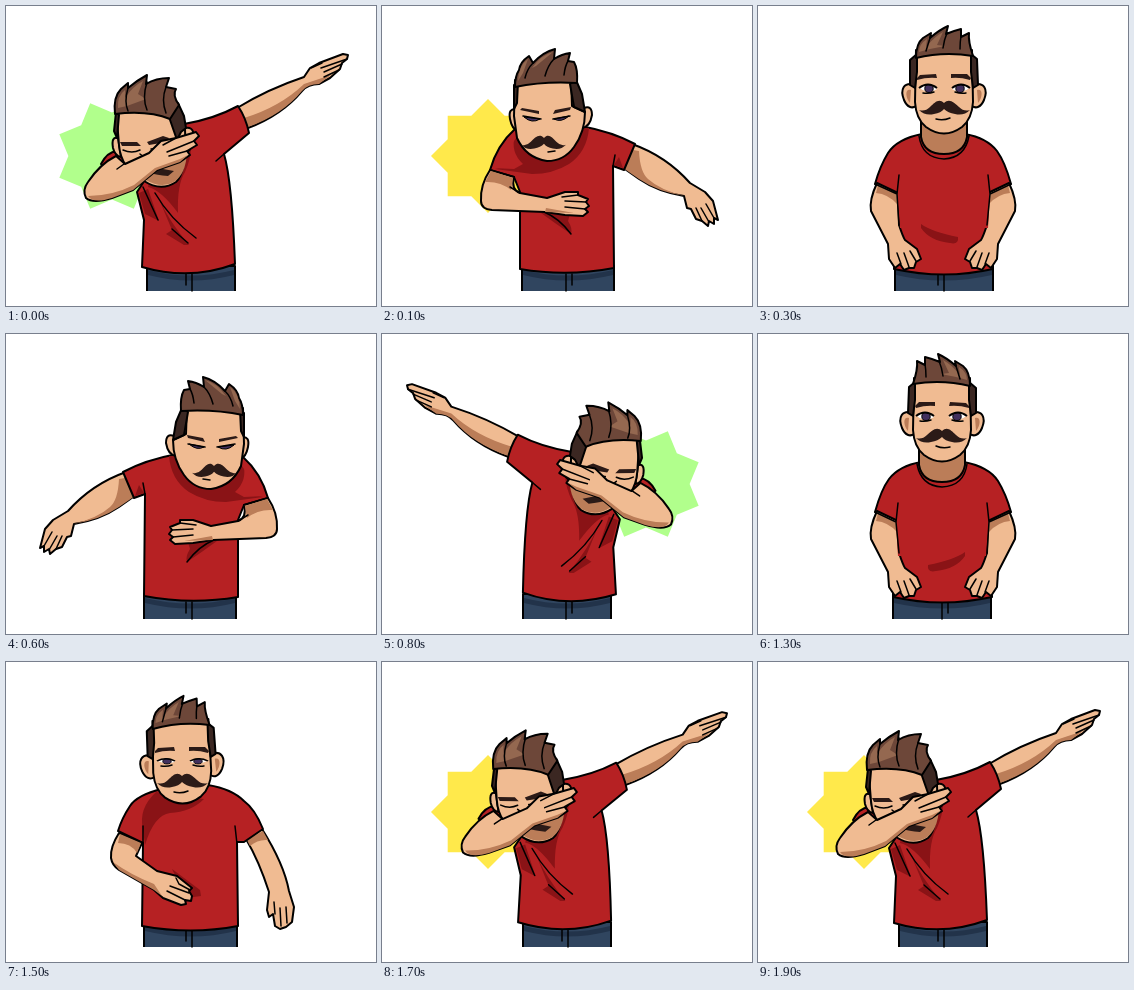
Recreate the animation shown at these times as an HTML page. Size 370 by 300 pixels, loop 2000 ms.

```html
<!DOCTYPE html>
<html lang="en">
<head>
<meta charset="utf-8">
<style>
  html, body { margin: 0; width: 100%; height: 100%; overflow: hidden; background: #fff; }
  svg { display: block; width: 370px; height: 300px; }
  path, ellipse { stroke: #000; stroke-width: 2; stroke-linejoin: round; stroke-linecap: butt; fill: none; }
  .flat { stroke: none; }
  .thin { stroke-width: 1.5; stroke-linecap: round; }
  .skin { fill: #f0bb92; }
  .tan { fill: #bb7d58; }
  .shirt { fill: #b62123; }
  .fold { fill: #8a1316; }
  .hair { fill: #6d4739; }
  .gloss { fill: #946850; }
  .dark { fill: #3b2722; }
  .brow { fill: #2b1a17; }
  .white { fill: #fff; }
  .iris { fill: #42305e; stroke-width: 1; }
  .jeans { fill: #30455f; }
  .denim { fill: #22334a; }
</style>
</head>
<body>
<svg viewBox="0 0 370 300"><g id="scene"></g></svg>
<script>
const path = (kind, d) => `<path class="${kind}" d="${d}"/>`;
const group = (transform, content) => `<g transform="${transform}">${content}</g>`;
const flip = content => group('translate(370 0) scale(-1 1)', content);

const jeans = (left, right) =>
  path('jeans', `M${left} 285V260H${right}V285`) +
  path('denim flat', `M${left + 1} 264Q185 275 ${right - 1} 264V269Q185 280 ${left + 1} 269Z`) +
  path('thin', 'M180 268V279M186 268V285');

const moustache =
  path('brow flat', 'M186 97C181 92 177 96 172 101Q167 106 161 104Q167 110 176 108Q183 107 186 103Q190 107 197 108Q206 110 212 104Q206 106 201 101C196 96 191 92 186 97Z');

const skull =
  path('skin', 'M158 79C145 75 142 84 146 94C149 101 154 103 158 100Z') +
  path('skin', 'M214 79C227 75 230 84 226 94C223 101 218 103 214 100Z') +
  path('tan flat', 'M153 84C147 82 147 91 152 97ZM219 84C225 82 225 91 220 97Z') +
  path('skin', 'M158 44L157 96Q158 113 168 121Q186 134 204 121Q214 113 215 96L214 44Z') +
  path('dark', 'M159 48L152 54V79L157 82L159 66Z') +
  path('dark', 'M213 48L219 53L220 79L215 82L213 66Z') +
  path('hair', 'M158 52C158 42 160 36 165 32L173 27L172 32Q181 24 190 20L188 28Q195 25 203 23L203 31L211 27Q210 35 215 50Q186 45 158 52Z') +
  path('gloss flat', 'M161 46Q161 38 169 33L168 41Q176 31 185 26L179 39L187 40L172 43Z') +
  path('thin', 'M168 45L172 32M185 42Q186 34 189 27M202 43Q202 36 203 30');

const features = openness =>
  path('brow flat', 'M159 72L162 69L178 68L179 72Q169 71 159 74ZM193 68L209 68L213 72L212 74Q202 71 193 72Z') +
  group(`translate(0 ${82 * (1 - openness)}) scale(1 ${openness})`,
    path('white flat', 'M162 82Q170 76 179 83Q170 89 162 82ZM194 83Q202 76 211 82Q203 89 194 83Z') +
    '<ellipse class="iris" cx="171" cy="82.5" rx="4.2" ry="4"/>' +
    '<ellipse class="iris" cx="202" cy="82.5" rx="4.2" ry="4"/>' +
    path('', 'M161 82Q170 75 179 82M194 82Q203 75 212 82')) +
  path('thin', 'M165 87Q171 88 176 86M197 86Q203 88 208 87') +
  moustache + path('thin', 'M178 113Q185 115 192 112');

const turnedHead =
  path('skin', 'M168 102Q160 99 160 109Q162 121 170 122Z') +
  path('skin', 'M236 103Q244 102 242 113Q240 123 235 124Z') +
  path('skin', 'M181 72L180 100L167 106Q167 126 178 141Q188 155 205 155Q226 152 235 132L238 110L237 74Z') +
  path('dark', 'M176 74L170 88L167 106L178 101L182 78Z') +
  path('dark', 'M234 76L238 79V103L235 97Z') +
  path('hair', 'M175 77Q174 63 178 56L184 55L182 47Q190 48 198 53L197 43Q209 46 219 57L223 50Q232 56 233 64Q237 70 237 81Q208 75 175 77Z') +
  path('gloss flat', 'M199 46Q211 49 220 62L216 60ZM224 53Q233 59 234 75L229 67Z') +
  path('thin', 'M188 69Q187 60 184 55M207 70Q204 59 198 53M227 72Q225 63 219 57') +
  path('brow flat', 'M181 101L197 104L199 108L182 104ZM213 105L230 102L232 104L213 108Z') +
  path('iris', 'M183 110L198 113Q191 117 183 110ZM212 113L228 111Q220 118 212 113Z') +
  path('thin', 'M182 110L199 113M211 113L229 110') +
  group('translate(208 132) scale(.88 .95) translate(-186 -97)', moustache) +
  path('thin', 'M197 145L204 146');

const restArm =
  path('skin', 'M119 177Q111 194 113 205L130 238L131 253L137 262L142 258L146 264L151 262L156 262L158 256L163 253L159 243L147 234Q145 231 141 219L140 187Z') +
  path('tan flat', 'M120 179L139 188V198Q130 188 118 187Z') +
  path('thin', 'M139 247L143 258M146 247L151 261M152 245L158 255');

const neutral =
  jeans(137, 235) +
  path('shirt', 'M164 128Q139 133 130 147Q122 160 117 178L139 188L136 263Q186 274 235 263L232 188L253 178Q247 156 239 145Q229 132 207 128Z') +
  restArm + flip(restArm) +
  path('shirt flat', 'M141 170L139 188L142 222H230L232 188L230 170Z') +
  path('thin', 'M117 178L139 188L141 169M139 188L141 219M253 178L232 188L230 169M232 188L229 219') +
  path('tan', 'M163 112V131Q166 148 186 148Q206 148 209 131V112Z') +
  path('thin', 'M161 130Q164 152 186 153Q207 152 211 130') +
  path('fold flat', 'M163 218Q174 226 200 231Q201 239 192 237Q172 235 163 222Z') +
  skull + features(1);

const lean =
  jeans(138, 231) +
  path('skin', 'M240 177Q253 199 263 230L261 248L263 255L267 252L269 264L274 267L280 265L286 260L288 245L283 229Q278 202 256 167Z') +
  path('tan flat', 'M241 178L257 169L262 178Q252 177 244 184Z') +
  path('thin', 'M269 252L268 240M275 264L274 246M281 261L280 245') +
  path('shirt', 'M156 127Q131 133 124 144Q116 156 112 169L137 181L136 264Q185 273 232 264L231 180L238 180L257 167Q249 147 238 139Q226 127 202 123Z') +
  path('fold flat', 'M150 130L198 137Q185 150 164 151Q148 153 139 183L137 167Q132 147 150 130Z') +
  path('fold flat', 'M166 207L194 228L195 234L180 236Z') +
  path('thin', 'M137 181V164M231 182L229 164') +
  path('skin', 'M113 171Q104 185 105 196Q106 203 113 208L148 228L157 236L175 243L180 242L179 238L185 239L186 234L183 229L186 226L171 214L151 209L130 194L136 181Z') +
  path('tan flat', 'M114 172L135 181L131 191Q125 181 112 181ZM107 200Q125 213 148 222L156 234L148 228L113 208Z') +
  path('thin', 'M164 224L183 231M161 229L179 238M170 216L173 222L184 228') +
  group('translate(-10 14) rotate(-2 186 90)', skull) +
  group('translate(-10 17)', features(.65));

const windUp = flip(
  jeans(138, 230) +
  path('skin', 'M120 138Q86 150 62 177L47 186L39 195L34 214L38 212L38 218L43 215L44 220L50 215L56 213L61 203L65 202L68 190Q94 186 113 173L130 161Z') +
  path('tan flat', 'M67 190Q92 184 104 173Q112 166 113 145L119 144L129 162L113 173Q94 186 67 190Z') +
  path('thin', 'M38 212L46 198M43 216L51 202M50 215L56 202') +
  path('shirt', 'M171 120Q139 126 117 138L128 164L139 160L138 262Q185 271 232 263V186L238 171L262 164Q255 139 237 123Z') +
  path('fold flat', 'M163 122Q165 146 183 158Q199 168 220 168L257 163Q240 160 246 147L234 129Z') +
  path('shirt flat', 'M237 129Q242 146 229 158L238 163L259 162Q253 142 240 128Z') +
  path('fold flat', 'M182 208L211 207Q196 218 181 228Q179 223 184 215ZM129 162L138 159L133 151Z') +
  path('thin', 'M139 160L137 149M181 228Q193 212 208 206M232 206V222') +
  path('skin', 'M238 171L262 164Q272 179 271 195Q271 203 260 204L207 206L187 209L169 210L164 206L167 203L163 200L166 196L164 193L174 189L174 186L187 186L205 192L232 187Q241 184 238 171Z') +
  path('tan flat', 'M239 172L261 165L267 176Q252 175 241 184ZM178 207L206 202L207 206Z') +
  path('thin', 'M166 196L187 195M167 203L187 201M174 189L190 191M232 187L242 181') +
  turnedHead
);

const dabLegs = jeans(141, 229);
const dabBody =
  path('skin', 'M231 102Q262 83 298 71L304 62L313 57L337 48L342 49L341 53L336 57L334 63L324 72L313 78Q302 78 296 85Q276 109 242 122Z') +
  path('tan flat', 'M242 121L238 112Q274 101 298 78L325 69L313 78Q302 78 296 85Q276 109 242 121Z') +
  path('thin', 'M341 53L315 62M336 58L318 66M333 64L318 71M305 62L316 57') +
  path('shirt', 'M178 118Q208 113 232 100Q240 112 243 127L218 148Q226 175 229 258Q184 275 136 261L138 214L131 186L152 154Z') +
  path('fold flat', 'M182 121Q190 141 179 166Q171 178 172 207Q155 184 142 181L146 165Z') +
  path('fold flat', 'M133 187L142 183L153 215L139 208ZM153 193Q163 215 183 239L178 239L160 228L166 224Z') +
  path('thin', 'M137 181L152 214M149 187Q164 213 190 232M166 223L182 237M218 148L210 155') +
  path('shirt', 'M111 145Q101 146 95 158L110 171L126 159Z') +
  path('skin', 'M176 123Q188 118 188 132Q186 146 176 149Z') +
  path('skin', 'M112 132Q105 130 107 142Q109 150 115 151Z') +
  path('skin', 'M110 102L113 139Q115 163 138 175Q155 186 170 176Q181 166 179 123L166 105Z') +
  path('tan flat', 'M139 163L181 146Q180 168 168 176Q155 183 140 174Z') +
  path('dark', 'M163 111L172 97L178 110L180 122L175 126L171 134Z') +
  path('dark', 'M110 106L108 125L111 132L113 109Z') +
  path('hair', 'M109 108Q107 91 115 83L122 77L122 82Q130 75 141 69L140 78Q150 72 163 72L160 81L170 83Q166 89 173 99L164 113Q142 104 109 108Z') +
  path('gloss flat', 'M112 102Q111 90 119 84L119 92Q127 80 137 75L132 88L140 93L121 100Z') +
  path('thin', 'M122 105Q118 96 122 82M141 104Q136 92 141 76M160 107Q155 94 160 81') +
  path('brow flat', 'M114 136L131 136L135 140L116 140ZM141 136L157 130L163 132L161 136L143 139Z') +
  path('thin', 'M117 144Q126 148 134 144M145 143Q153 143 162 138M134 148L138 151') +
  path('brow flat', 'M141 162Q151 158 157 163L168 165L162 170Q150 169 145 167Z') +
  path('skin', 'M110 150Q94 158 82 176Q76 184 80 192Q87 198 106 192L127 184L151 164L174 156L184 149L181 145L191 139L188 135L193 130L190 126L170 132L155 135L143 147L119 158Z') +
  path('tan flat', 'M82 190Q106 190 128 179L149 162L174 153L182 149L174 156L151 164L127 184L106 192Q87 198 82 190Z') +
  path('thin', 'M161 146L188 135M163 150L181 145M157 139L170 132M118 158L111 163');

const starPoints = Array.from({ length: 16 }, (_, i) => {
  const radius = i % 2 ? 43.6 : 57, angle = i * Math.PI / 8;
  return [106 + radius * Math.cos(angle), 150 + radius * Math.sin(angle)].map(n => n.toFixed(1));
}).join(' ');
const star = yellow =>
  `<polygon points="${starPoints}" fill="${yellow ? '#ffe94b' : '#b1ff8c'}" transform="rotate(${yellow ? 0 : 22.5} 106 150)"/>`;

const dab = dabLegs + dabBody;
const overshoot = dabLegs + group('rotate(.8 185 265)', dabBody);
const cycle = [neutral, lean, windUp, overshoot, overshoot, dab, dab, windUp, lean, neutral];
const scene = document.getElementById('scene');
let shown = -1;

// The ten poses play once facing each way.
function draw() {
  const step = (Math.floor(performance.now() / 100) + 6) % 20;
  if (step !== shown) {
    const phase = step % 10;
    const burst = phase >= 3 && phase <= 7 ? star(phase % 2) : '';
    const picture = burst + cycle[phase];
    scene.innerHTML = step < 10 ? picture : flip(picture);
    shown = step;
  }
  requestAnimationFrame(draw);
}
draw();
</script>
</body>
</html>
```
